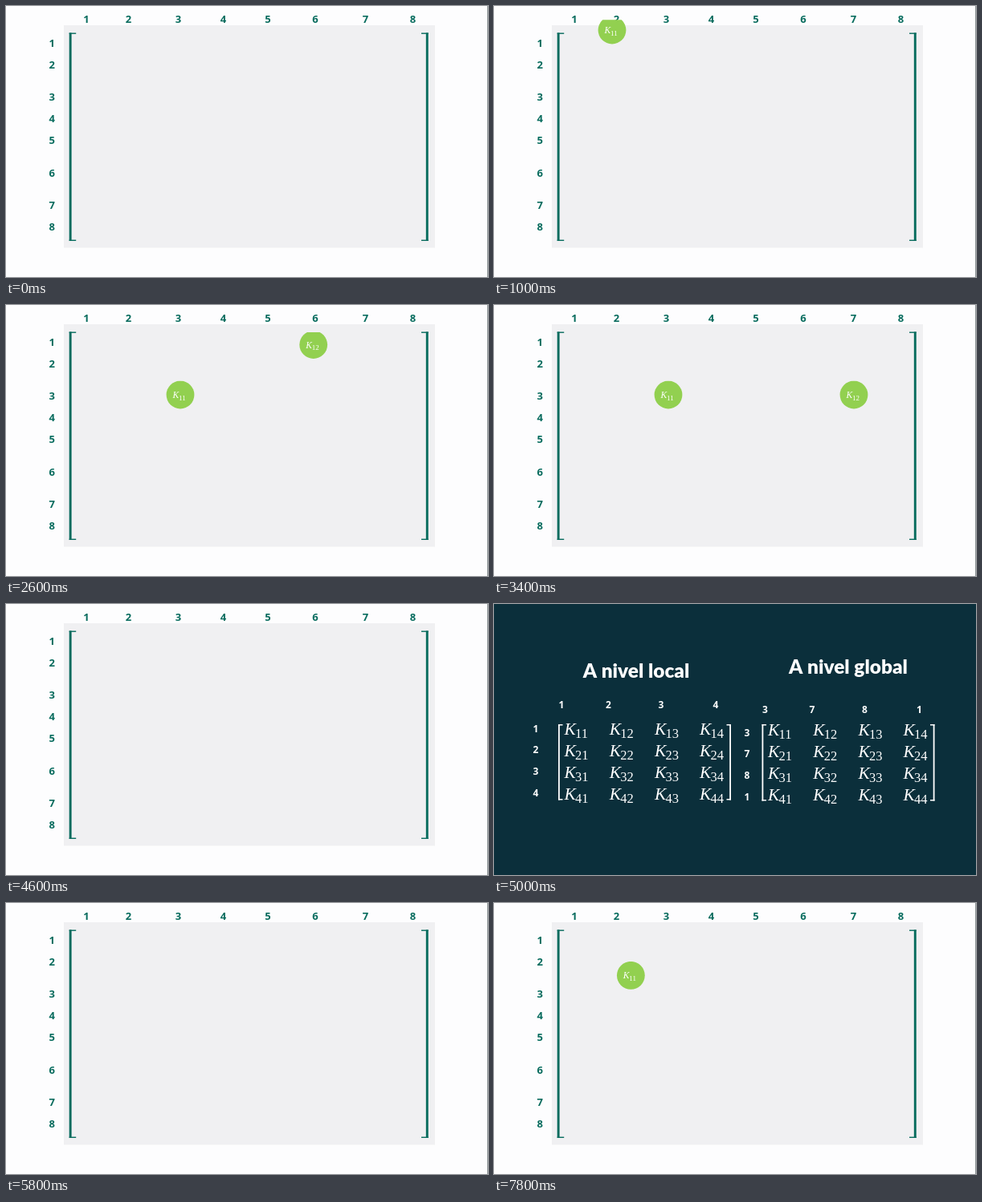
An HTML page with a canvas for the animation above (8 s loop, 600 by 338 pixels).

```html
<!DOCTYPE html>
<html lang="es">
<head>
<meta charset="utf-8">
<title>Ensamblaje de la matriz</title>
<style>
html, body { margin: 0; width: 100%; height: 100%; overflow: hidden; background: #fdfdfe; }
canvas { display: block; width: 100vw; height: 100vh; }
</style>
</head>
<body>
<canvas id="stage"></canvas>
<script>
const W = 600, H = 338, LOOP = 8000;
const canvas = document.getElementById('stage');
const ctx = canvas.getContext('2d');
const GREEN = '#066b5d', LIME = '#92d050', NAVY = '#0b2f3b', WHITE = '#fff';
const LABEL = 'bold 13px "Open Sans", "Noto Sans", sans-serif';
const SMALL = 'bold 12px "Open Sans", "Noto Sans", sans-serif';
const TITLE = '900 24.4px Lato, sans-serif';
const SERIF = '"Liberation Serif", serif';

const cols = [100, 152.5, 214.5, 270.5, 326, 385, 447.5, 506.5];
const rows = [46, 73, 113.5, 140.5, 167.5, 208, 248, 275];

// Bouncing balls: start and end in loop time, resting place, subscript
const balls = [
  { from: 800, to: 4000, x: 217, y: 112, sub: '11' },
  { from: 2382, to: 4000, x: 448, y: 112, sub: '12' },
  { from: 7511, to: LOOP, x: 217, y: 112, sub: '11' }
];
const RATE = 2.5, R = 17.4;

// Piecewise linear curve through [input, output] pairs
function curve(points, u) {
  for (let i = 1; i < points.length; i++) {
    const [a, p] = points[i - 1], [b, q] = points[i];
    if (u <= b) return p + (q - p) * (u - a) / (b - a);
  }
  return 1;
}

const drift = [[0, 0], [.14, .36], [.43, .73], [.71, .91], [1, 1]];
const fall = [[0, 0], [.25, .07], [.5, .2], [.75, .467], [1, 1]];
const hop = [[0, 0], [.125, .2665], [.25, .4], [.375, .465], [.5, .5],
  [.625, .535], [.75, .6], [.875, .7335], [1, 1]];
const hops = [[664, 664, 9], [1328, 332, 27], [1660, 164, 81]];

function bounceHeight(ms) {
  if (ms < 664) return Math.sin(Math.PI * (.5 + curve(fall, ms / 664) / 2)) / 3;
  for (const [start, length, div] of hops) {
    if (ms < start + length) return Math.sin(Math.PI * curve(hop, (ms - start) / length)) / div;
  }
  return 0;
}

function text(str, x, y, font, color, align = 'left') {
  ctx.font = font;
  ctx.fillStyle = color;
  ctx.textAlign = align;
  ctx.fillText(str, x, y);
}

function digit(n, x, y, font, color) {
  text(n, x, y + 4.6, font, color, 'center');
}

function bracket(x, top, bottom, reach, thick, thin, color) {
  const dir = Math.sign(reach), left = Math.min(x, x + reach);
  ctx.fillStyle = color;
  ctx.fillRect(dir > 0 ? x : x - thick, top, thick, bottom - top);
  ctx.fillRect(left, top, Math.abs(reach), thin);
  ctx.fillRect(left, bottom - thin, Math.abs(reach), thin);
}

function drawGrid() {
  ctx.fillStyle = '#fdfdfe';
  ctx.fillRect(0, 0, W, H);
  ctx.fillStyle = '#f0f0f2';
  ctx.fillRect(72, 24, 462, 277.5);
  ctx.fillStyle = '#8d9496';
  ctx.fillRect(599, 0, 1, H);
  cols.forEach((x, i) => digit(i + 1, x, 16, LABEL, GREEN));
  rows.forEach((y, i) => digit(i + 1, 57.3, y, LABEL, GREEN));
  bracket(78.7, 33.5, 293, 8.5, 2.9, 1.4, GREEN);
  bracket(525.7, 33.5, 293, -8.7, 2.9, 1.4, GREEN);
}

function drawBall(ball, t) {
  if (t <= ball.from || t >= ball.to) return;
  const ms = (t - ball.from) * RATE;
  const x = ball.x - W / 4 * (1 - curve(drift, ms / 1822));
  const y = ball.y - H * bounceHeight(ms);
  const shown = Math.min(1, ms / 580) * R * 2;
  ctx.save();
  ctx.beginPath();
  ctx.rect(x - R - 1, y + R - shown, R * 2 + 2, shown + 1);
  ctx.clip();
  ctx.beginPath();
  ctx.arc(x, y, R, 0, Math.PI * 2);
  ctx.fillStyle = LIME;
  ctx.fill();
  text('K', x - 9.5, y + 4, `italic 11.5px ${SERIF}`, WHITE);
  text(ball.sub, x - 2, y + 6.5, `9px ${SERIF}`, WHITE);
  ctx.restore();
}

function drawMatrix(m) {
  text(m.title, m.titleX, m.titleY, TITLE, WHITE, 'center');
  m.nodes.forEach((n, i) => {
    digit(n, m.x + [4, 62.5, 128, 196][i], m.headY, SMALL, WHITE);
    digit(n, m.sideX, m.sideY + i * 26.8, SMALL, WHITE);
    for (let j = 0; j < 4; j++) {
      const x = m.x + 7 + j * 56.2, y = m.y + i * 26.9;
      text('K', x + .5, y, `italic 21.5px ${SERIF}`, WHITE);
      text(`${i + 1}${j + 1}`, x + 14, y + 4, `16.5px ${SERIF}`, WHITE);
    }
  });
  bracket(m.x, 150, m.bottom, 5.5, 1.8, 1.5, WHITE);
  bracket(m.x + 215, 150, m.bottom, -5.5, 1.8, 1.5, WHITE);
}

const matrices = [
  { title: 'A nivel local', titleX: 177, titleY: 92, nodes: [1, 2, 3, 4],
    x: 80, y: 163, headY: 125.5, sideX: 52, sideY: 155, bottom: 244.5 },
  { title: 'A nivel global', titleX: 441, titleY: 86.5, nodes: [3, 7, 8, 1],
    x: 333.5, y: 164, headY: 131, sideX: 315, sideY: 160, bottom: 245.5 }
];

function draw(t) {
  if (t >= 5000 && t < 5800) {
    ctx.fillStyle = NAVY;
    ctx.fillRect(0, 0, W, H);
    matrices.forEach(drawMatrix);
  } else {
    drawGrid();
    balls.forEach(ball => drawBall(ball, t));
  }
}

function resize() {
  const dpr = window.devicePixelRatio || 1;
  canvas.width = Math.round(innerWidth * dpr);
  canvas.height = Math.round(innerHeight * dpr);
  ctx.setTransform(canvas.width / W, 0, 0, canvas.height / H, 0, 0);
}

const begin = performance.now();
function tick() {
  draw((performance.now() - begin) % LOOP);
  requestAnimationFrame(tick);
}

addEventListener('resize', resize);
resize();
tick();
</script>
</body>
</html>
```
